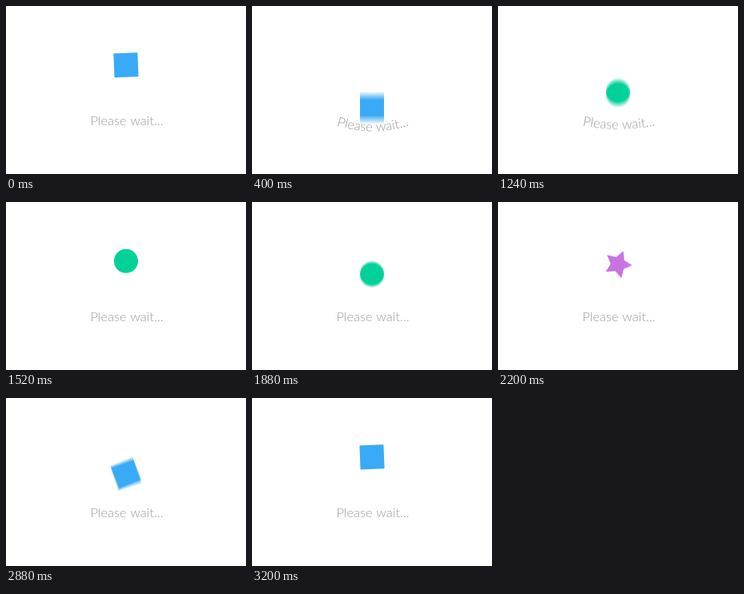
Animation, 300 px wide and 210 px high, one loop 3240 ms. Source, as an HTML page with a canvas:

```html
<!DOCTYPE html>
<html lang="en">
<head>
<meta charset="utf-8">
<title>Please wait...</title>
<style>
  html, body { margin: 0; width: 100%; height: 100%; overflow: hidden; background: #fff; }
  canvas { display: block; }
</style>
</head>
<body>
<canvas id="stage" width="300" height="210"></canvas>
<script>
const W = 300, H = 210;
const STEP = 40, LOOP = 3240, BOUNCE = 800, HALF = BOUNCE / 2;
const SHUTTER = 20, SAMPLES = 10;
const TOP = 73.8, DROP = 59;
const TEXT = 'Please wait...', TEXT_X = 151, BASELINE = 149.3;

const stage = document.getElementById('stage').getContext('2d');
const layer = document.createElement('canvas');
layer.width = W;
layer.height = H;
const ctx = layer.getContext('2d');
ctx.font = '300 16.5px Lato, "Open Sans", sans-serif';

function polygon(radii, count, cy) {
  for (let i = 0; i < count; i++) {
    const a = i * 2 * Math.PI / count, r = radii[i % radii.length];
    ctx.lineTo(r * Math.sin(a), cy - r * Math.cos(a));
  }
  ctx.closePath();
}

// turn: degrees over one bounce; shift: vertical offset of the pivot
const shapes = [
  { color: '#39aaf5', turn: -180, shift: 0, path: () => ctx.rect(-15, -15, 30, 30) },
  { color: '#f74e76', turn: -238, shift: 3.8, path: () => polygon([17.2], 3, 2.2) },
  { color: '#02d29a', turn: 0, shift: 0, path: () => ctx.arc(0, 0, 15, 0, 2 * Math.PI) },
  { color: '#c774e2', turn: -190, shift: 1, path: () => polygon([17.9, 9.2], 10, 0) }
];

function drawShape(time, cycle) {
  const shape = shapes[cycle % shapes.length];
  const v = (time - cycle * BOUNCE) / HALF;   // -1 and 1 at the impacts, 0 at the top
  const u = v > 1 ? 2 - v : v;
  const angle = shape.turn * (Math.min(v, 1) + 1) / 2;
  ctx.save();
  ctx.translate(150, TOP + shape.shift + DROP * u ** 4);
  ctx.rotate(angle * Math.PI / 180);
  ctx.beginPath();
  shape.path();
  ctx.fillStyle = shape.color;
  ctx.fill();
  ctx.restore();
}

function drawText(time) {
  const away = Math.abs(time % BOUNCE - HALF);
  const bend = 7.5 * Math.max(0, 1 - (away / 80) ** 2);
  const half = ctx.measureText(TEXT).width / 2;
  ctx.fillStyle = '#9c9ca4';
  if (!bend) {
    ctx.fillText(TEXT, TEXT_X - half, BASELINE);
    return;
  }
  [...TEXT].forEach((char, i) => {
    const width = ctx.measureText(char).width;
    const x = ctx.measureText(TEXT.slice(0, i + 1)).width - width / 2 - half;
    const p = x / half;
    ctx.save();
    ctx.translate(TEXT_X + x, BASELINE + bend * (1 - p * p));
    ctx.rotate(Math.atan(-2 * bend * p / half));
    ctx.fillText(char, -width / 2, 0);
    ctx.restore();
  });
}

// Motion blur: running average of several moments while the shutter is open
function render(time) {
  const cycle = Math.floor((time + HALF - STEP) / BOUNCE);
  for (let i = 0; i < SAMPLES; i++) {
    const moment = time + SHUTTER * (i + 0.5) / SAMPLES;
    ctx.fillStyle = '#fff';
    ctx.fillRect(0, 0, W, H);
    drawText(moment);
    drawShape(moment, cycle);
    stage.globalAlpha = 1 / (i + 1);
    stage.drawImage(layer, 0, 0);
  }
}

let start, shown;
function tick(now) {
  start ??= now;
  const time = Math.floor((now - start) % LOOP / STEP) * STEP;
  if (time !== shown) render(shown = time);
  requestAnimationFrame(tick);
}
render(0);
requestAnimationFrame(tick);
</script>
</body>
</html>
```
